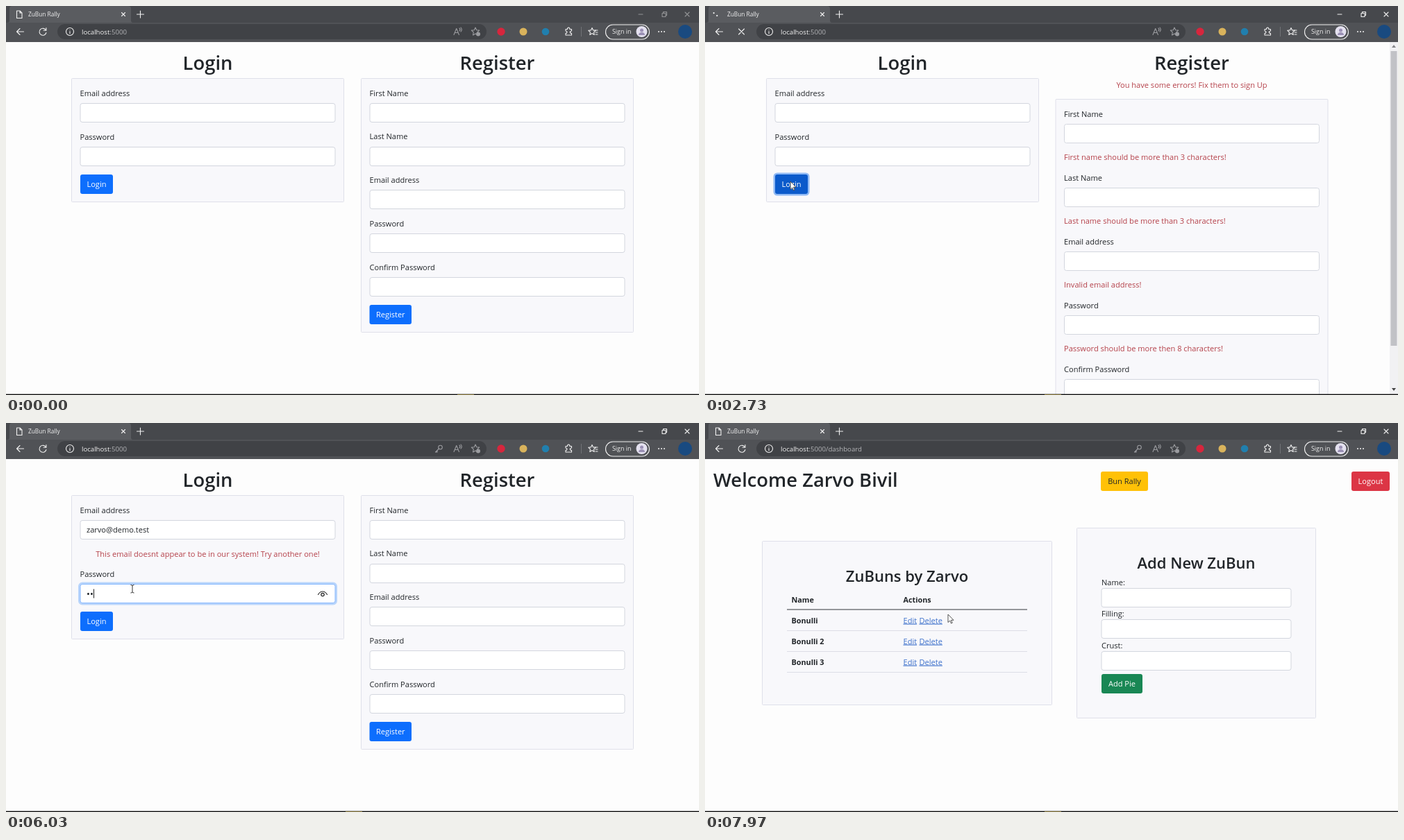
Recreate the animation shown at these times as an HTML page. Size 998 by 561 pixels, loop 8 s.

```html
<!DOCTYPE html>
<html lang="en">
<head>
<meta charset="utf-8">
<title>ZuBun Rally</title>
<style>
html, body { margin: 0; width: 100%; height: 100%; overflow: hidden; background: #fdfdfd; }
svg { display: block; width: 100%; height: 100%; font-family: "Open Sans", "Noto Sans", sans-serif; }
text { fill: #212529; white-space: pre; }
.h { font-weight: 600; }
.b { font-weight: 700; }
.mid { text-anchor: middle; }
.err { fill: #b5414a; }
.link { fill: #3f72cc; text-decoration: underline; }
.card { fill: #f8f8fb; stroke: #dfe0ea; }
.field { fill: #fff; stroke: #d3d6de; }
.ring { fill: none; stroke: #b9d5fb; stroke-width: 3; }
.btn .ring { stroke: #8fb9f5; opacity: 0; }
.btn.pressed .ring { opacity: 1; }
.btn.pressed .face { fill: #0b5acb; }
.line { fill: none; stroke: #f0f0f0; stroke-width: 1.1; stroke-linecap: round; stroke-linejoin: round; }
.dim { stroke: #9b9ca0; }
.light { fill: #f2f2f2; }
.grey { fill: #b4b5b8; }
</style>
</head>
<body>
<script>
const LOOP = 8000;
const EMAIL = 'zarvo@demo.test';

// Drawing helpers
const text = (x, y, s, cls = '', size = 11.05) =>
  `<text x="${x}" y="${y}" class="${cls}" font-size="${size}">${s}</text>`;
const rect = (x, y, w, h, attrs) => `<rect x="${x}" y="${y}" width="${w}" height="${h}" ${attrs}/>`;
const circle = (x, y, r, attrs) => `<circle cx="${x}" cy="${y}" r="${r}" ${attrs}/>`;
const line = (d, cls = '') => `<path d="${d}" class="line ${cls}"/>`;
const group = (id, ...parts) => `<g id="${id}">${parts.join('')}</g>`;
const card = (x, y, w, h) => rect(x + .5, y + .5, w - 1, h - 1, 'rx="1" class="card"');
const field = (x, y, w = 368) => rect(x + .5, y + .5, w - 1, 27, 'rx="3" class="field"');
const button = (id, x, y, w, label, fill = '#0d6efd', ink = '#fff') =>
  `<g id="${id}" class="btn">${rect(x - 1, y - 1, w + 2, 30, 'rx="4" class="ring"')}` +
  rect(x, y, w, 28, `rx="3" class="face" fill="${fill}"`) +
  `<text x="${x + w / 2}" y="${y + 18}" class="mid" font-size="11.05" style="fill:${ink}">${label}</text></g>`;

function loginForm(id, x, error) {
  const shift = error ? 29.3 : 0;
  return text(x + 196.5, 92, 'Login', 'h mid', 27.4) +
    card(x, 104, 393, Math.round(179 + shift)) +
    text(x + 12.5, 130, 'Email address') + field(x + 12.5, 140) +
    (error ? text(x + 196.5, 193, error, 'err mid') : '') +
    text(x + 12.5, 193 + shift, 'Password') + field(x + 12.5, Math.round(203 + shift)) +
    button(id, x + 13, Math.round(243 + shift), 47, 'Login');
}

function registerForm(x, errors) {
  const labels = ['First Name', 'Last Name', 'Email address', 'Password', 'Confirm Password'];
  const top = errors ? 134 : 104, pitch = errors ? 92.1 : 62.8;
  const rows = labels.map((label, i) => {
    const y = top + i * pitch;
    return text(x + 12.5, y + 25.5, label) + field(x + 12.5, Math.round(y + 35.7)) +
      (errors && errors[i] ? text(x + 12.5, y + 88, errors[i], 'err') : '');
  }).join('');
  return text(x + 196.5, 92, 'Register', 'h mid', 27.4) +
    (errors ? text(x + 196.5, 117.5, 'You have some errors! Fix them to sign Up', 'err mid') : '') +
    card(x, top, 393, errors ? 500 : 367) + rows +
    (errors ? '' : button('register', x + 12.5, 431, 60.5, 'Register'));
}

const scrollbar = rect(986, 52, 12, 508, 'fill="#f1f1f3"') +
  rect(987.5, 65, 9, 425, 'fill="#c1c2c6"') +
  '<path d="M989 60l3-4 3 4z" fill="#85868a"/><path d="M989 551l3 4 3-4z" fill="#444"/>';

const pieRow = (name, i) => {
  const y = 288.5 + i * 30;
  return text(124.5, y, name, 'b', 10.8) + text(285.5, y, 'Edit', 'link') + text(308.5, y, 'Delete', 'link') +
    rect(118, y + 10.5, 346, 1, 'fill="#dcdde6"');
};

const dashboard = text(12, 92, 'Welcome Zarvo Bivil', 'h', 27.4) +
  button('derby', 570, 70, 68, 'Bun Rally', '#ffc107', '#212529') +
  button('logout', 931, 70, 55, 'Logout', '#dc3545') +
  card(82, 170, 418, 237) + text(291, 229, 'ZuBuns by Zarvo', 'h mid', 22) +
  text(124.5, 258.5, 'Name', 'b', 10.8) + text(285.5, 258.5, 'Actions', 'b', 10.8) +
  rect(118, 268.5, 346, 1, 'fill="#33363a"') +
  ['Bonulli', 'Bonulli 2', 'Bonulli 3'].map(pieRow).join('') +
  card(535, 151, 345, 275) + text(707.5, 210, 'Add New ZuBun', 'h mid', 22) +
  ['Name:', 'Filling:', 'Crust:'].map((s, i) =>
    text(571, 234 + i * 45.4, s) + field(570.5, Math.round(238 + i * 45.4), 274)).join('') +
  button('add', 571, 362, 59, 'Add Pie', '#198754');

const star = (x, y, r) => 'M' + Array.from({ length: 10 }, (_, i) => {
  const a = i * Math.PI / 5 - Math.PI / 2, q = i % 2 ? r * .48 : r;
  return `${(x + q * Math.cos(a)).toFixed(1)} ${(y + q * Math.sin(a)).toFixed(1)}`;
}).join('L') + 'Z';

const browser = rect(0, 0, 998, 52, 'fill="#46484c"') +
  rect(0, 24, 998, 28, 'fill="#505256"') +
  '<path d="M2 24q3 0 3-3V4q0-4 4-4h167q4 0 4 4v17q0 3 3 3z" fill="#5a5c60"/>' +
  rect(74, 26, 618, 22, 'rx="11" fill="#404246"') +
  group('page', line('M15.500 7h4.500l3 3v7.500h-7.500zM20 7v3h3')) +
  group('spinner', circle(0, -3, 1.1, 'class="light"'), circle(0, 3, 1.1, 'class="light"')) +
  text(32, 15, 'ZuBun Rally', 'light', 8.3) +
  line('M166.500 9.500l5 5m0-5l-5 5M188.500 12h10m-5-5v10') +
  group('controls', line('M911 12h6M945 10.500h5v5h-5zM946.500 10v-1.500h5v5h-1.500M978 9l6 6m0-6l-6 6')) +
  line('M25.500 37h-10m4.500-4.500l-4.500 4.500 4.500 4.500') +
  group('reload', line('M57.500 35a5 5 0 1 0 .4 3.500M57.900 31.500v3.700h-3.700')) +
  group('stop', line('M48.500 33l8 8m0-8l-8 8')) +
  circle(92, 37, 5.5, 'class="line"') + line('M92 36.500v3.200M92 34.200v.1') +
  '<text x="109" y="40.500" font-size="9.65" class="grey"><tspan class="light">localhost</tspan>:5000<tspan id="path"></tspan></text>' +
  group('key', circle(625.5, 35, 2.8, 'class="line dim"'), line('M623.500 37l-5 5h2.500v-2', 'dim')) +
  line('M645 41.500l3.700-9 3.700 9m-6.200-3h5M653 32q2 2 0 4M655 31q2.500 3 0 6', 'dim') +
  line(star(676, 37, 6), 'dim') + circle(680, 40.5, 3, 'fill="#9b9ca0"') +
  circle(713, 37, 5.7, 'fill="#d7263d"') + circle(745, 37, 5.5, 'fill="#d9b35c"') +
  circle(777, 37, 5.3, 'fill="#217fae"') +
  line('M806 33.500h2.500q0-2.500 1.700-2.500t1.700 2.500h2.600v2.500q-2.200 0-2.200 1.700t2.200 1.700v2.600h-8.500v-2.600q2 0 2-1.700t-2-1.700z') +
  rect(828, 30, 1, 14, 'fill="#717377"') +
  line(star(844, 37, 5.5)) + line('M848 35h4M849 38h3M849 41h3') +
  rect(863.5, 27, 63, 21, 'rx="10.5" class="line"') + text(873, 40.3, 'Sign in', 'light', 8.9) +
  circle(915.5, 37, 8, 'fill="#e4e1ef"') + circle(915.5, 35, 2.5, 'fill="#9b91b5"') +
  '<path d="M911 42q0-4 4.500-4t4.500 4z" fill="#9b91b5"/>' +
  [940, 944, 948].map(x => circle(x, 37, 1, 'class="light"')).join('') +
  circle(978, 37, 10, 'fill="#194a80"');

document.body.innerHTML = `<svg viewBox="0 0 998 561">
  ${rect(0, 0, 998, 561, 'fill="#fdfdfd"')}
  ${group('start', loginForm('loginStart', 94, ''), registerForm(511))}
  ${group('invalid', loginForm('loginInvalid', 88, ''), registerForm(504.5, [
    'First name should be more than 3 characters!', 'Last name should be more than 3 characters!',
    'Invalid email address!', 'Password should be more then 8 characters!']), scrollbar)}
  ${group('unknown', loginForm('loginUnknown', 94, 'This email doesnt appear to be in our system! Try another one!'),
    registerForm(511),
    group('focus', rect(105.5, 0, 370, 30, 'rx="4.5" class="ring"'), rect(107, 1.5, 367, 27, 'rx="3" fill="#fff" stroke="#86b7fe"')),
    text(116, 158, '', 'email'), text(116, 251.4, '', 'dots', 13),
    group('eye', '<path class="line" style="stroke:#222" d="M449.500 247.500q2.500-4.500 6.500-4.500t6.500 4.500"/>',
      circle(456, 247.5, 2.2, 'fill="none" stroke="#222" stroke-width="1.2"')),
    rect(0, 0, 1, 13, 'id="caret" fill="#222"'))}
  ${group('dash', dashboard)}
  ${browser}
  ${rect(0, 559.6, 998, 1.4, 'fill="#111"')}${rect(0, 560, 24, 1, 'id="task" fill="#8b7a3a"')}
  ${group('beam', '<path d="M-2.500-5.500q2.500 0 2.500 1.500q0-1.500 2.500-1.500M0-4v8.500M-2.500 6q2.500 0 2.500-1.500q0 1.500 2.500 1.500" fill="none" stroke="#333"/>')}
  ${group('arrow', '<path d="M-3-7v11.500l2.700-2.500 1.800 4 1.700-.8-1.800-3.900h3.600z" fill="#fff" stroke="#444" stroke-width=".9"/>')}
</svg>`;

const $ = id => document.getElementById(id);
const show = (id, on) => { $(id).style.display = on ? '' : 'none'; };
const place = (id, x, y) => $(id).setAttribute('transform', `translate(${x} ${y})`);
const within = (t, a, b) => t >= a && t < b;
const typed = (t, start, pitch, max) => Math.max(0, Math.min(max, Math.floor((t - start) / pitch) + 1));

// Pointer stops: time, x, y
const STOPS = [
  [300, 1004, 200], [830, 720, 385], [1100, 552, 447], [1600, 552, 447], [2130, 162, 157],
  [2450, 126, 260], [2850, 126, 260], [3330, 191, 150], [3700, 197, 156], [5030, 197, 156],
  [5320, 182, 239], [6600, 182, 239], [6850, 135, 288], [6960, 135, 288], [7330, 352, 283], [8000, 353, 283]
];

function pointerAt(t) {
  const i = STOPS.findIndex(s => s[0] > t);
  if (i < 1) return STOPS[0].slice(1);
  const [t0, x0, y0] = STOPS[i - 1], [t1, x1, y1] = STOPS[i];
  const p = (t - t0) / (t1 - t0), e = p * p * (3 - 2 * p);
  return [x0 + (x1 - x0) * e, y0 + (y1 - y0) * e];
}

const SCENES = [['start', 0], ['invalid', 1420], ['unknown', 2800], ['dash', 7700]];
const fieldsOf = Object.fromEntries(SCENES.map(([id]) =>
  [id, [...$(id).querySelectorAll('.field')].map(f => ['x', 'y', 'width', 'height'].map(k => +f.getAttribute(k)))]));
const email = document.querySelector('.email'), dots = document.querySelector('.dots');

function render(t) {
  const scene = SCENES.filter(s => s[1] <= t).pop()[0];
  SCENES.forEach(([id]) => show(id, id === scene));

  const loading = within(t, 1150, 1420) || within(t, 2500, 2800) || within(t, 6900, 7700);
  show('page', !loading);
  show('reload', !loading);
  show('spinner', loading);
  show('stop', loading);
  $('spinner').setAttribute('transform', `translate(15 12) rotate(${(t - 7370) * .36})`);
  $('controls').setAttribute('opacity', t < 1100 ? .45 : 1);
  $('task').setAttribute('x', t < 1100 ? 650 : 489);
  $('path').textContent = scene === 'dash' ? '/dashboard' : '';
  show('key', t >= 5920);

  $('register').classList.toggle('pressed', t >= 1150);
  $('loginInvalid').classList.toggle('pressed', t >= 2500);
  $('loginUnknown').classList.toggle('pressed', t >= 6900);

  const inEmail = within(t, 3750, 5350), inPassword = within(t, 5350, 6900);
  const letters = typed(t, 3950, 85, EMAIL.length), bullets = typed(t, 5920, 95, 8);
  email.textContent = EMAIL.slice(0, letters);
  dots.textContent = '•'.repeat(bullets);
  show('focus', inEmail || inPassword);
  place('focus', 0, inEmail ? 139 : 231);
  show('eye', inPassword && bullets > 0);
  const idleFrom = inEmail ? 3750 : 5350;
  const blinkOff = !(inEmail ? letters : bullets) && (t - idleFrom) % 1060 >= 530;
  show('caret', (inEmail || inPassword) && !blinkOff);
  if (scene === 'unknown') {
    const width = (inEmail ? email : dots).getComputedTextLength();
    place('caret', Math.round(116 + width), inEmail ? 147 : 239.5);
  }

  const [x, y] = pointerAt(t);
  const overField = fieldsOf[scene].some(([fx, fy, w, h]) => x > fx && x < fx + w && y > fy && y < fy + h);
  show('beam', overField);
  show('arrow', !overField && t > 300);
  place('beam', x, y);
  place('arrow', x, y);
}

function tick() {
  render(performance.now() % LOOP);
  requestAnimationFrame(tick);
}
tick();
</script>
</body>
</html>
```
